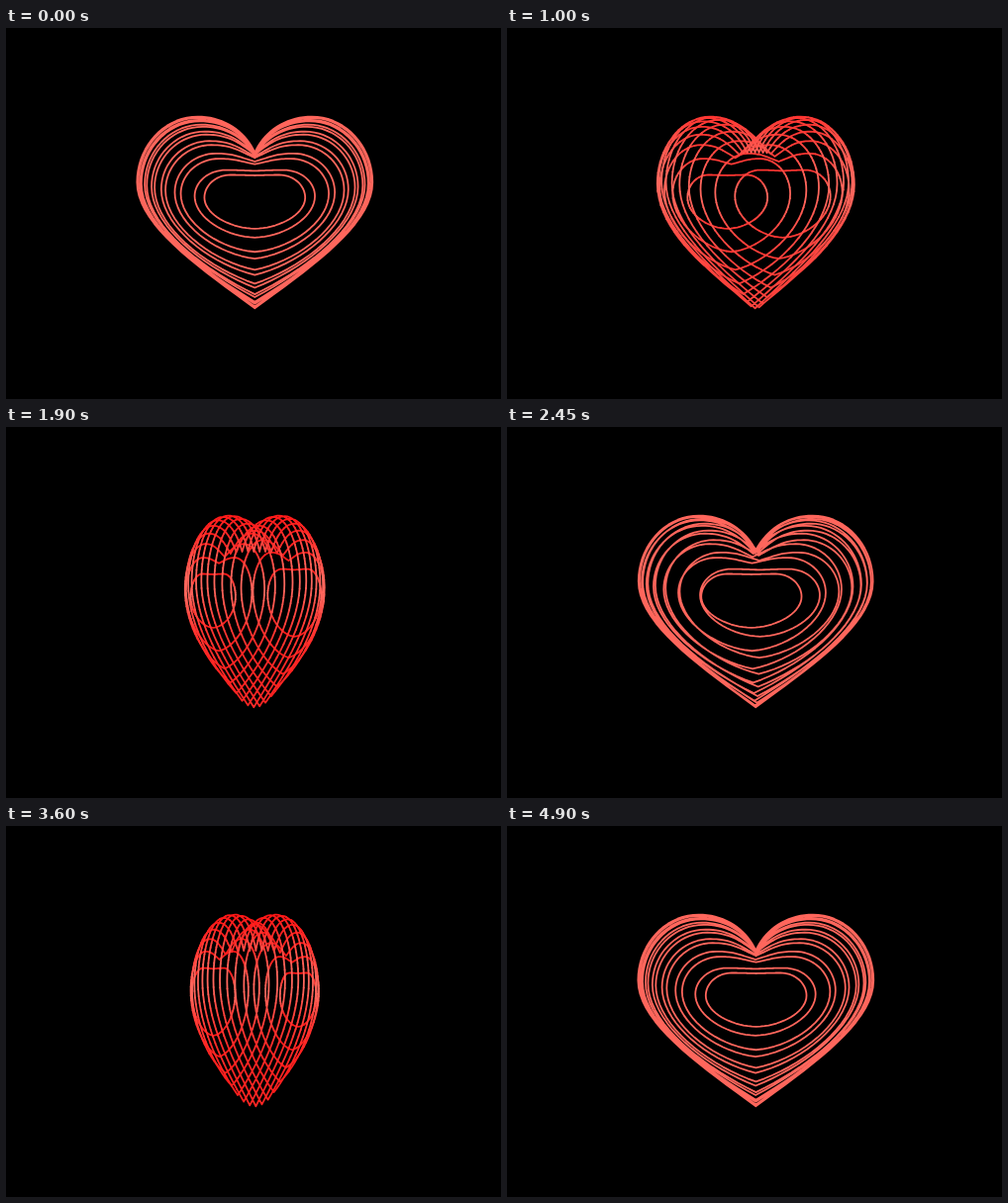
Recreate the animation shown at these times as an HTML page with a canvas. Size 500x375 px, loop 4.95 s.

```html
<!DOCTYPE html>
<html lang="en">
<head>
<meta charset="utf-8">
<title>Turning wire heart</title>
<style>
  html, body { margin: 0; width: 100%; height: 100%; overflow: hidden; background: #000; }
  canvas { display: block; width: 500px; height: 375px; }
</style>
</head>
<body>
<canvas id="stage" width="500" height="375"></canvas>
<script>
const ctx = document.getElementById('stage').getContext('2d');

const LOOP = 4950, TURN = 5000, STEP = 50;
const CX = 251.3, HALF_WIDTH = 119, DEPTH = 52;
const SLICES = 15, FIRST = 0.904, GAP = 0.126;
const LEVELS = 16, STEPS = 18;

const cubic = (a, b, c, d, t) => {
  const u = 1 - t;
  return u * u * u * a + 3 * u * u * t * b + 3 * u * t * t * c + t * t * t * d;
};

// Outline of the heart cut at depth s (-1 to 1): a heart in the middle, an oval at the ends.
function slice(s) {
  const d = Math.abs(s), o = 1 - s * s;
  const w = HALF_WIDTH * Math.sqrt(o);
  const notch = 126 + 23 * Math.pow(d / FIRST, 4.5);
  const top = Math.min(176 - 86.5 * Math.pow(o, 0.73), notch - 0.5);
  const side = 156 + 19 * s * s;
  const tip = 176 + 107.3 * Math.pow(o, 0.816);
  const lobe = 0.485 * w, dip = notch - top, drop = tip - side;

  const curves = [
    [0, notch, lobe * (0.5 - 0.34 * dip / 37), notch - 0.6 * dip, lobe * 0.55, top, lobe, top],
    [lobe, top, lobe + 0.55 * (w - lobe), top, w, side - 0.55 * (side - top), w, side],
    [w, side, w, side + (0.57 - 0.24 * o) * drop, 0.5 * w, tip - 0.34 * o * o * drop, 0, tip]
  ];

  const half = [];
  for (const c of curves) {
    for (let i = 0; i < STEPS; i++) {
      const t = i / STEPS;
      half.push([cubic(c[0], c[2], c[4], c[6], t), cubic(c[1], c[3], c[5], c[7], t)]);
    }
  }
  const mirror = half.slice(1).reverse().map(([x, y]) => [-x, y]);
  return { s, points: [...half, [0, tip], ...mirror, half[0]] };
}

const slices = Array.from({ length: SLICES }, (_, i) => slice(FIRST - GAP * i));

const shade = k => `rgb(255, ${Math.round(22 + 80 * k)}, ${Math.round(22 + 70 * k)})`;

function draw(angle) {
  const cos = Math.cos(angle), sin = Math.sin(angle);
  const paths = Array.from({ length: LEVELS + 1 }, () => new Path2D());

  for (const { s, points } of slices) {
    const shift = CX - s * DEPTH * sin;
    let last = -1;
    for (let i = 1; i < points.length; i++) {
      const [x0, y0] = points[i - 1], [x1, y1] = points[i];
      // Wire that runs across the view shines, wire that runs into it does not.
      const lean = (x1 - x0) / Math.hypot(x1 - x0, y1 - y0) * sin;
      const level = Math.round(LEVELS * Math.pow(1 - lean * lean, 2));
      const path = paths[level];
      if (level !== last) path.moveTo(shift + x0 * cos, y0);
      path.lineTo(shift + x1 * cos, y1);
      last = level;
    }
  }

  ctx.fillStyle = '#000';
  ctx.fillRect(0, 0, 500, 375);
  ctx.lineWidth = 1.8;
  ctx.lineCap = ctx.lineJoin = 'round';
  paths.forEach((path, level) => {
    ctx.strokeStyle = shade(level / LEVELS);
    ctx.stroke(path);
  });
}

function tick() {
  const t = Math.floor(performance.now() % LOOP / STEP) * STEP;
  const p = t / TURN;
  draw(2 * Math.PI * p * p * (3 - 2 * p));
  requestAnimationFrame(tick);
}
tick();
</script>
</body>
</html>
```
